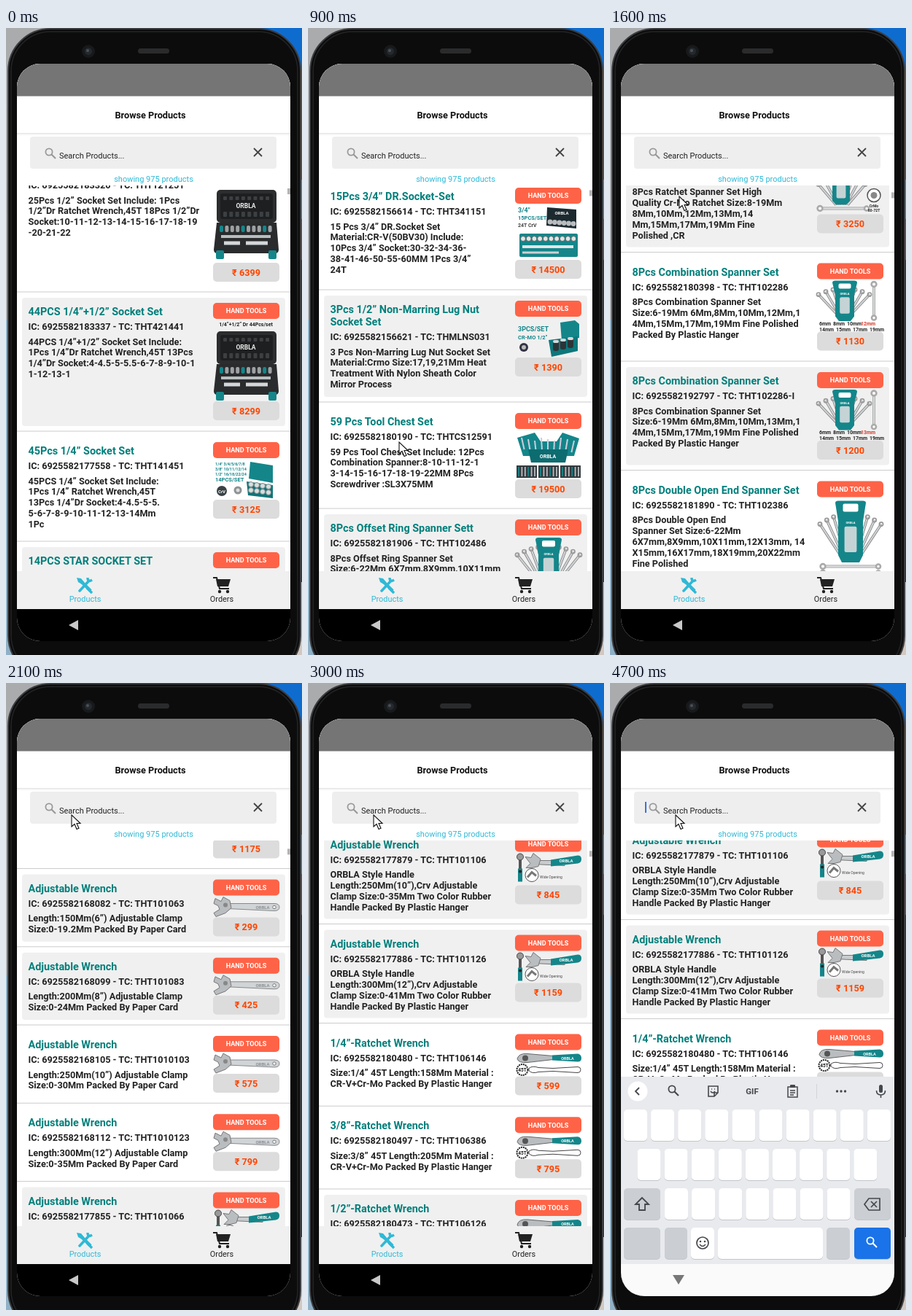
An HTML page that plays this animation: 406 by 860 pixels, repeating every 5000 ms.

```html
<!DOCTYPE html>
<html lang="en">
<head>
<meta charset="utf-8">
<title>Browse Products</title>
<style>
html, body { margin: 0; width: 100%; height: 100%; overflow: hidden; background: #111; }
svg { display: block; font-family: Roboto, sans-serif; }
.b { font-weight: 700; }
.m { text-anchor: middle; }
</style>
</head>
<body>
<svg id="stage" width="406" height="860" viewBox="0 0 406 860"></svg>
<script>
const TEAL = '#007f7b', TOOL = '#14868a', CYAN = '#2fb9d6', INK = '#222', STEEL = '#b9bdc0';
const BRAND = 'ORBLA';

const rect = (x, y, w, h, fill, r = 0, more = '') =>
  `<rect x="${x}" y="${y}" width="${w}" height="${h}" rx="${r}" fill="${fill}" ${more}/>`;
const circle = (x, y, r, fill, more = '') => `<circle cx="${x}" cy="${y}" r="${r}" fill="${fill}" ${more}/>`;
const shape = (d, fill, more = '') => `<path d="${d}" fill="${fill}" ${more}/>`;
const line = (d, stroke, w = 1.5, more = '') =>
  `<path d="${d}" fill="none" stroke="${stroke}" stroke-width="${w}" ${more}/>`;
const text = (x, y, str, size, fill = INK, cls = '') =>
  `<text x="${x}" y="${y}" font-size="${size}" fill="${fill}" class="${cls}">${str}</text>`;
const group = (x, y, body) => `<g transform="translate(${x} ${y})">${body}</g>`;
const repeat = (n, fn) => Array.from({ length: n }, (_, i) => fn(i)).join('');
const lens = (x, y, color) => group(x, y,
  circle(-2, -2, 4.6, 'none', `stroke="${color}" stroke-width="1.8"`) + line('M1.5 1.5 7 7', color, 2.1));

// Product pictures, 91 px wide, origin below the category tag
const fan = (cx, y, w, h, n = 8) => repeat(n, i => {
  const k = i / (n - 1) - .5, x = cx + k * w, tip = y + k * k * h * .9;
  const shaft = `M${cx + k * w * .25} ${y + h}L${x} ${tip}`;
  return line(shaft, '#777', 3.6) + line(shaft, '#d0d3d5', 2.2) +
    circle(x, tip, 2.6, 'none', 'stroke="#999" stroke-width="1.7"');
});
const hanger = (cx, y, w, h) =>
  shape(`M${cx - w / 2} ${y + 3}q0-3 4-3h${w - 8}q4 0 4 3l-4 ${h * .3}v${h * .55}l-5 ${h * .12}h${18 - w}l-5-${h * .12}v-${h * .55}z`, TOOL) +
  rect(cx - w / 4, y + 4, w / 2, h * .13, '#fff', 2) +
  rect(cx - w / 5, y + h * .42, w * .4, h * .42, '#c5d3d5', 2) +
  text(cx, y + h * .37, BRAND, 4, '#fff', 'b m');
const spanner = (x, y, len) =>
  line(`M${x + 4} ${y}h${len - 8}`, '#999', 4) + line(`M${x + 4} ${y}h${len - 8}`, '#d8dadb', 2.6) +
  circle(x + 4, y, 3.4, '#fff', 'stroke="#aaa" stroke-width="2.6"') +
  circle(x + len - 4, y, 3, '#fff', 'stroke="#aaa" stroke-width="2.6"');

const pictures = {
  toolcase: caption =>
    text(45, 7, caption, 7, INK, 'b m') +
    rect(5, 14, 82, 45, '#2b2d2f', 5) + rect(10, 19, 72, 35, '#1d1f20', 3) +
    repeat(8, i => rect(14 + i * 8.3, 23, 5, 5, '#3d4042', 1) + rect(14 + i * 8.3, 44, 5, 7, '#3d4042', 1)) +
    text(45, 39, BRAND, 8.5, '#eee', 'b m') +
    shape('M5 59h82l3 37q0 5-5 5H6q-5 0-5-5z', '#292b2d') +
    repeat(10, i => rect(9 + i * 7.4, 63, 5, 9, i % 4 ? '#9da1a4' : TOOL, 2)) +
    line('M11 78h68', STEEL, 4) + line('M15 87h22m8 0h30', '#d4d7d9', 5) +
    rect(4, 97, 11, 12, TOOL, 2) + rect(76, 97, 11, 12, TOOL, 2),
  caseset: label =>
    repeat(3, i => text(3, 7 + i * 7, ['1/4" 3/4/5/6/7/8', '3/8" 10/11/12/14', '1/2" 16/18/22/24'][i], 5.5, TOOL, 'b')) +
    text(3, 29, label, 7.5, TOOL, 'b') +
    circle(12, 42, 7, '#3a4246') + text(12, 44.5, 'CrV', 6, '#fff', 'b m') +
    circle(34, 41, 5.5, '#8d9294') + circle(34, 41, 2.5, '#ddd') +
    shape('M51 2l31 5v24l-33-6z', TOOL) + shape('M46 29l36 5v18l-34-4z', '#0e7478') +
    repeat(8, i => circle(52 + i % 4 * 8, 33 + (i >> 2) * 8 + i % 4, 3.5, '#d9dddf', 'stroke="#788"')),
  panels: () =>
    text(4, 9, '3/4"', 9, TOOL, 'b') + text(4, 19, '15PCS/SET', 7.5, TOOL, 'b') +
    text(4, 29, '24T  CrV', 7, '#444', 'b') +
    shape('M44 2l40 3v26l-41-4z', '#1c2a30') + text(64, 12, BRAND, 6, '#fff', 'b m') +
    repeat(6, i => circle(48 + i * 6.4, 22 + i * .5, 3.4, STEEL)) +
    rect(6, 38, 80, 32, TOOL, 2) +
    repeat(10, i => circle(11 + i * 7.7, 45, 3.5, '#e2e5e6', 'stroke="#566"')) +
    line('M10 56h70', '#e2e5e6', 4) + line('M10 64h50', '#cdd1d3', 3),
  lug: () =>
    text(4, 17, '3PCS/SET', 9, TOOL, 'b') + text(4, 28, 'CR-MO 1/2"', 7.5, TOOL, 'b') +
    circle(12, 39, 6, '#334') + circle(12, 39, 3, '#bbb') +
    shape('M62 5l20-3 6 5v19l-24 4z', TOOL) + shape('M46 29l40-5v20l-36 8z', '#0d777b') +
    repeat(3, i => rect(52 + i * 10, 29 - i * 2, 8, 15, '#2d3437', 3) + rect(52 + i * 10, 29 - i * 2, 8, 4, '#d5d9db', 2)),
  chest: () =>
    shape('M3 9l24-7 8 12h22l8-12 23 8-7 24H11z', TOOL) +
    repeat(9, i => line(`M${9 + i * 9} ${9 + i % 3 * 2}l${(4 - i) * .9} 16`, '#ccd', 2)) +
    shape('M18 25h55l-4 18H22z', '#0d6c70') + text(45, 37, BRAND, 7, '#fff', 'b m') +
    repeat(3, i => rect(2 + i * 30, 47, 28, 17, '#343b3f') +
      repeat(6, j => line(`M${5 + i * 30 + j * 4.4} 49v13`, j % 3 ? STEEL : TOOL, 1.8))),
  offset: () => fan(46, 12, 86, 52, 10) + hanger(46, 0, 36, 66),
  ratchets: () => fan(34, 10, 64, 36) + hanger(33, 0, 32, 44) + spanner(0, 51, 72) +
    circle(78, 33, 9, '#fff', 'stroke="#555" stroke-width="1.5"') + circle(78, 33, 4.5, '#888') +
    text(78, 49, 'CrMo', 5, INK, 'b m') + text(78, 55, '60-72T', 5, INK, 'b m'),
  combination: last => fan(37, 10, 70, 36) + hanger(38, -1, 34, 54) +
    `<g transform="rotate(90 78 0)">${spanner(78, 0, 54)}</g>` +
    ['6mm', '8mm', '10mm', last].map((s, i) => text(3 + i * 19, 60, s, 7, i > 2 ? '#d43a2b' : INK, 'b')).join('') +
    ['14mm', '15mm', '17mm', '19mm'].map((s, i) => text(3 + i * 23, 68, s, 7, INK, 'b')).join(''),
  openend: () => fan(46, 20, 84, 62, 10) + hanger(46, 2, 42, 84) + spanner(4, 92, 84) + spanner(4, 101, 84),
  wrench: () =>
    shape('M18 8L84 8q7 0 7 5t-7 5L20 15z', '#d1d4d6', 'stroke="#85898c"') +
    shape('M3 1l8 4 3-6 9 5 2 10-8 7-13 5-3-5 8-5-2-5-6-3z', STEEL, 'stroke="#777"') +
    circle(84, 13, 2.2, '#fff', 'stroke="#777"') + circle(17, 10, 3, '#888') + text(68, 15.5, BRAND, 6, '#8b8f92', 'b m'),
  gripwrench: () =>
    line('M7 2v20', '#555', 4) + line('M7 20v18', TOOL, 6) + circle(7, 4, 4.5, '#999', 'stroke="#444"') + circle(7, 24, 2, '#222') +
    shape('M24 9l44 0v7l-42-2z', '#c9cccf', 'stroke="#777"') +
    shape('M14 4l8 1 3-6 10 8-3 10-9 2-8 0 6-6z', STEEL, 'stroke="#777"') +
    shape('M49 8l37-6q5 0 5 5t-5 6l-37 4z', TOOL) + text(70, 11, BRAND, 6, '#fff', 'b m') +
    circle(23, 29, 9, '#fff', 'stroke="#555"') + line('M17 32l6-7 6 5', '#777', 3) + text(34, 33, 'Wide Opening', 5, '#444'),
  ratchet: () =>
    shape('M3 9q2-8 14-7l35 3v5l-35 4q-12 1-14-5z', STEEL, 'stroke="#666"') + circle(14, 8, 4, '#555') +
    shape('M51 4l35-2q5 1 5 6t-5 5l-35-2z', TOOL) + text(72, 10, BRAND, 5.5, '#fff', 'b m') +
    circle(10, 24, 7.5, '#fff', 'stroke="#222" stroke-width="2" stroke-dasharray="2 1"') + text(10, 26.5, '45T', 6.5, INK, 'b m') +
    shape('M19 22q5-4 13-1l20 1 34-2q4 0 4 4t-4 4l-34-2-20 1q-9 3-13-2z', '#fff', 'stroke="#444"')
};

// [height, price offset, shaded, title, item code, trade code, description, price, picture, picture label]
const adjustable = (h, p, shaded, ic, tc, desc, price, pic) => [h, p, shaded, 'Adjustable Wrench', ic, tc, desc, price, pic];
const plain = (shaded, ic, tc, size, max, price) => adjustable(107.25, 53, shaded, ic, tc,
  `Length:${size} Adjustable Clamp|Size:0-${max}Mm Packed By Paper Card`, price, 'wrench');
const grip = (p, ic, tc, size, max, price) => adjustable(136, p, 1, ic, tc,
  `${BRAND} Style Handle|Length:${size},Crv Adjustable|Clamp Size:0-${max}Mm Two Color Rubber|Handle Packed By Plastic Hanger`, price, 'gripwrench');
const ratchet = (shaded, inch, ic, tc, len, price) => [113.75, 59, shaded, inch + '”-Ratchet Wrench', ic, tc,
  `Size:${inch}” 45T Length:${len}Mm Material :|CR-V+Cr-Mo Packed By Plastic Hanger`, price, 'ratchet'];
const combination = (shaded, ic, tc, mm, price) => [149.5, 95, shaded, '8Pcs Combination Spanner Set', ic, tc,
  `8Pcs Combination Spanner Set|Size:6-19Mm 6Mm,8Mm,10Mm,${mm}Mm,1|4Mm,15Mm,17Mm,19Mm Fine Polished|Packed By Plastic Hanger`, price, 'combination', mm + 'mm'];

const products = [
  [194, 140, 0, '25PCS 1/2” Socket Set', '6925582183320', 'THT121251', '25Pcs 1/2” Socket Set Include: 1Pcs|1/2”Dr Ratchet Wrench,45T 18Pcs 1/2”Dr|Socket:10-11-12-13-14-15-16-17-18-19|-20-21-22', 6399, 'toolcase', '1/2” Dr 25Pcs/set'],
  [191, 136, 1, '44PCS 1/4”+1/2” Socket Set', '6925582183337', 'THT421441', '44PCS 1/4”+1/2” Socket Set Include:|1Pcs 1/4”Dr Ratchet Wrench,45T 13Pcs|1/4”Dr Socket:4-4.5-5-5.5-6-7-8-9-10-1|1-12-13-1', 8299, 'toolcase', '1/4”+1/2” Dr 44Pcs/set'],
  [151, 80, 0, '45Pcs 1/4” Socket Set', '6925582177558', 'THT141451', '45PCS 1/4” Socket Set Include:|1Pcs 1/4” Ratchet Wrench,45T|13Pcs 1/4”Dr Socket:4-4.5-5-5.|5-6-7-8-9-10-11-12-13-14Mm|1Pc', 3125, 'caseset', '14PCS/SET'],
  [155, 80, 1, '14PCS STAR SOCKET SET', '6925582177565', 'THT141141', '14Pcs Star Socket Set|Include: E4-E5-E6-E7-E8-E10-|E11-E12-E14-E16-E18-E20-|E22-E24 Material:CR-V', 2450, 'caseset', '14PCS/SET'],
  [155, 100, 0, '15Pcs 3/4” DR.Socket-Set', '6925582156614', 'THT341151', '15 Pcs 3/4” DR.Socket Set|Material:CR-V(50BV30) Include:|10Pcs 3/4” Socket:30-32-34-36-|38-41-46-50-55-60MM 1Pcs 3/4”|24T', 14500, 'panels'],
  [154, 79, 1, '3Pcs 1/2” Non-Marring Lug Nut|Socket Set', '6925582156621', 'THMLNS031', '3 Pcs Non-Marring Lug Nut Socket Set|Material:Crmo Size:17,19,21Mm Heat|Treatment With Nylon Sheath Color|Mirror Process', 1390, 'lug'],
  [146, 92, 0, '59 Pcs Tool Chest Set', '6925582180190', 'THTCS12591', '59 Pcs Tool Chest Set Include: 12Pcs|Combination Spanner:8-10-11-12-1|3-14-15-16-17-18-19-22MM 8Pcs|Screwdriver :SL3X75MM', 19500, 'chest'],
  [150, 95, 1, '8Pcs Offset Ring Spanner Sett', '6925582181906', 'THT102486', '8Pcs Offset Ring Spanner Set|Size:6-22Mm 6X7mm,8X9mm,10X11mm|12X13mm,14X15mm,16X17mm|18X19mm,20X22mm', 1850, 'offset'],
  combination(0, '6925582180404', 'THT102287', 12, 1350),
  [151, 85, 1, '8Pcs Ratchet Spanner Set', '6925582180411', 'THT102686', '8Pcs Ratchet Spanner Set High|Quality Cr-Mo Ratchet Size:8-19Mm|8Mm,10Mm,12Mm,13Mm,14|Mm,15Mm,17Mm,19Mm Fine|Polished ,CR', 3250, 'ratchets'],
  combination(0, '6925582180398', 'THT102286', 12, 1130),
  combination(1, '6925582192797', 'THT102286-I', 13, 1200),
  [191, 137, 0, '8Pcs Double Open End Spanner Set', '6925582181890', 'THT102386', '8Pcs Double Open End|Spanner Set Size:6-22Mm|6X7mm,8X9mm,10X11mm,12X13mm, 14|X15mm,16X17mm,18X19mm,20X22mm|Fine Polished', 1175, 'openend'],
  plain(1, '6925582168082', 'THT101063', '150Mm(6”)', '19.2', 299),
  plain(1, '6925582168099', 'THT101083', '200Mm(8”)', 24, 425),
  plain(0, '6925582168105', 'THT1010103', '250Mm(10”)', 30, 575),
  plain(0, '6925582168112', 'THT1010123', '300Mm(12”)', 35, 799),
  grip(69, '6925582177855', 'THT101066', '150Mm(6”)', 24, 499),
  grip(69, '6925582177862', 'THT101086', '200Mm(8”)', 30, 645),
  grip(69, '6925582177879', 'THT101106', '250Mm(10”)', 35, 845),
  grip(67, '6925582177886', 'THT101126', '300Mm(12”)', 41, 1159),
  ratchet(0, '1/4', '6925582180480', 'THT106146', 158, 599),
  ratchet(0, '3/8', '6925582180497', 'THT106386', 205, 795),
  ratchet(1, '1/2', '6925582180473', 'THT106126', 255, 975)
];

const card = ([h, p, shaded, title, ic, tc, desc, price, pic, label]) => {
  const titles = title.split('|'), y = 27 + (titles.length - 1) * 17;
  return (shaded ? rect(22, 8, 361, h - 15, '#f0f0f0', 4) : '') +
    titles.map((s, i) => text(30.5, 32 + i * 17, s, 14.4, TEAL, 'b')).join('') +
    text(30.5, y + 25.2, `IC: ${ic} - TC: ${tc}`, 12.65, INK, 'b') +
    desc.split('|').map((s, i) => text(30.5, y + 45.5 + i * 14.9, s, 12.65, INK, 'b')).join('') +
    group(284, 40, pictures[pic](label)) +
    rect(284, 15, 91, 22, '#ff6347', 5) + text(329.5, 29.3, 'HAND TOOLS', 9.1, '#fff', 'b m') +
    rect(284, 14 + p, 91, 26, '#dcdcdc', 5) + text(329.5, 31.6 + p, '₹ ' + price, 12.65, '#ff4500', 'b m') +
    rect(15, h - .5, 375, 1, '#ccc');
};
let cardTop = 168;
const list = products.map(item => {
  const body = group(0, cardTop, card(item));
  cardTop += item[0];
  return body;
}).join('');

const key = (x, y, w, fill = '#fff') => rect(x, y + 1, w, 43, '#c3c6ca', 5) + rect(x, y, w, 43, fill, 5);
const keys = (n, x, y) => repeat(n, i => key(x + i * 37.1, y, 32));
const GREY = '#cbced3', ICON = '#44474b';
const keyboard = rect(15, 540, 375, 257, '#e8eaee') +
  circle(38, 560, 13.5, '#fff') + line('M40 555l-5 5 5 5', ICON, 1.8) + lens(87, 559, ICON) +
  line('M135 553h13v9l-5 5h-8zM148 562h-5v5M138 560q3 4 6 0M139 557h1M143 557h1', ICON, 1.6) +
  text(195, 564, 'GIF', 11.5, ICON, 'b m') +
  line('M244 554h13v14h-13zM247 559h7M247 562h7M247 565h5', ICON, 1.5) + rect(247, 551, 7, 4, ICON, 1) +
  rect(283, 550, 1, 20, '#d2d4d8') + repeat(3, i => circle(311.5 + i * 5.5, 560, 1.7, ICON)) +
  rect(369, 551, 5, 11, ICON, 2.5) + line('M365.5 559q0 6 6 6t6-6M371.5 565v4', ICON, 1.6) +
  keys(10, 19, 585) + keys(9, 37.5, 639) + keys(7, 75, 693) +
  key(19, 693, 50, GREY) + key(335, 693, 50, GREY) +
  line('M44 706l-9 9h5v8h8v-8h5z', ICON, 1.8) +
  line('M349 715l6-8h15v16h-15zM358 711l8 8M366 711l-8 8', ICON, 1.7) +
  key(19, 747, 50, GREY) + key(75, 747, 31, GREY) + key(111, 747, 32) + key(148, 747, 144) +
  key(297, 747, 32, GREY) + key(335, 747, 50, '#1a73e8') + lens(359, 767, '#fff') +
  circle(127, 768, 8, 'none', `stroke="${ICON}" stroke-width="1.7"`) + circle(124, 766, 1.3, ICON) + circle(130, 766, 1.3, ICON) +
  line('M123 770q4 5 8 0', ICON, 1.5);

const backdrop = rect(0, 0, 60, 400, '#a9abad') + rect(0, 400, 60, 460, '#8fb0c6') +
  rect(340, 0, 66, 208, '#0f6ccf') + rect(340, 208, 66, 54, '#dc6540') + rect(340, 262, 66, 56, '#1b7d8c') +
  rect(340, 318, 66, 442, '#33373d') + rect(340, 760, 66, 100, '#d3c8c0');
const phone = rect(3, 1, 401, 890, '#0c0c0d', 58, 'stroke="#3c3d3f" stroke-width="2"') +
  rect(7, 5, 393, 882, 'none', 54, 'stroke="#232425" stroke-width="1.5"') +
  circle(113, 32, 9, '#17191b') + circle(113, 32, 5, '#25292e') + circle(112, 31, 2, '#4a5158') +
  rect(181, 28, 43, 7, '#2a2b2c', 3.5);
const header = rect(15, 49, 375, 167, '#fff') + rect(15, 49, 375, 44.5, '#757575') +
  text(198, 124, 'Browse Products', 12.7, '#111', 'b m') +
  rect(15, 144, 375, 1, '#e4e4e4') + rect(15, 145, 375, 2, '#f5f5f5') +
  rect(33, 149, 338, 44, '#eee', 4) + lens(61, 172, '#999') +
  text(73, 179, 'Search Products...', 11, INK) + line('M340 165l11 11m0-11l-11 11', '#444', 1.8) +
  text(202.5, 211, 'showing 975 products', 11.03, CYAN, 'm');
const tabs = rect(15, 745, 375, 52, '#f0f0f0') +
  line('M101 757l15 15', CYAN, 4.5) + line('M114 758l-13 14', CYAN, 3.5, 'stroke-linecap="round"') +
  shape('M97 754l6 1 4 5-3 3-5-3z', CYAN) + line('M118 757q-6 4-6-3M111 768l7 7', CYAN, 3.4) +
  text(108.5, 786.5, 'Products', 10.9, CYAN, 'm') +
  line('M284 754h5l4 15h13', INK, 2) + shape('M288 756h20l-3 10h-15z', INK) +
  circle(293, 773, 2.2, INK) + circle(304, 773, 2.2, INK) + text(296, 786.5, 'Orders', 10.9, INK, 'm');

const part = id => document.getElementById(id);
part('stage').innerHTML = `<defs><clipPath id="screen">${rect(15, 49, 375, 792, '#000', 32)}</clipPath>` +
  `<clipPath id="view">${rect(15, 216, 375, 529, '#000')}</clipPath></defs>` + backdrop + phone +
  `<g clip-path="url(#screen)">${rect(15, 49, 375, 792, '#fff')}
    <g clip-path="url(#view)"><g id="list">${list}</g></g>
    <g id="thumb">${rect(386, 220, 4, 8, '#b4b4b4')}</g>${header}${tabs}
    <g id="caret">${rect(48, 163, 2, 15, '#3f6fe0')}</g>
    <g id="keyboard">${keyboard}</g>
    ${rect(15, 797, 375, 44, '#000')}${shape('M86 819l13-7v14z', '#c9c9c9')}
    <g id="whitebar">${rect(15, 797, 375, 44, '#fafafa')}${shape('M86 812h16l-8 13z', '#777')}</g>
  </g>
  <g id="pointer">${shape('M0 0v16l4-3.5 3 7 3-1.3-3-6.7h5z', '#fff', 'stroke="#111" stroke-width="1.1"')}</g>`;
// The thumb runs beside the list, above the header
part('tabs');

// [time, offset, speed in px/ms]
const scrollKeys = [[0, 0, .85], [900, 655, .7], [1600, 1457, 1.2], [2100, 2000, 1.2], [3000, 2761, .03], [3500, 2767, 0], [5000, 2767, 0]];
// [time, x, y]
const pointerKeys = [[400, 135, 640], [900, 125, 568], [1600, 95, 231], [2000, 90, 181], [5000, 90, 181]];

const span = (keyList, t) => {
  const i = Math.max(1, keyList.findIndex(k => k[0] > t)), a = keyList[i - 1], b = keyList[i];
  return [a, b, (t - a[0]) / (b[0] - a[0])];
};
const scrollAt = t => {
  const [a, b, u] = span(scrollKeys, t), d = b[0] - a[0], v = 1 - u;
  return a[1] * v * v * (1 + 2 * u) + b[1] * u * u * (3 - 2 * u) + d * u * v * (a[2] * v - b[2] * u);
};
const move = (id, x, y) => part(id).setAttribute('transform', `translate(${x} ${y})`);
const show = (id, on) => part(id).setAttribute('visibility', on ? 'visible' : 'hidden');

function draw() {
  const t = Math.floor(performance.now() % 5000 / 100) * 100;
  const offset = scrollAt(t);
  move('list', 0, -offset);
  move('thumb', 0, offset / 270);

  const [a, b, u] = span(pointerKeys, t);
  move('pointer', a[1] + (b[1] - a[1]) * u, a[2] + (b[2] - a[2]) * u);
  show('pointer', t >= 400);

  show('caret', t >= 3700 && (t - 3700) % 1000 < 500);
  const rise = Math.min(1, Math.max(0, (t - 4100) / 400));
  move('keyboard', 0, 257 * (1 - rise) ** 2);
  show('keyboard', rise > 0);
  show('whitebar', rise > 0);
  requestAnimationFrame(draw);
}
draw();
</script>
</body>
</html>
```
